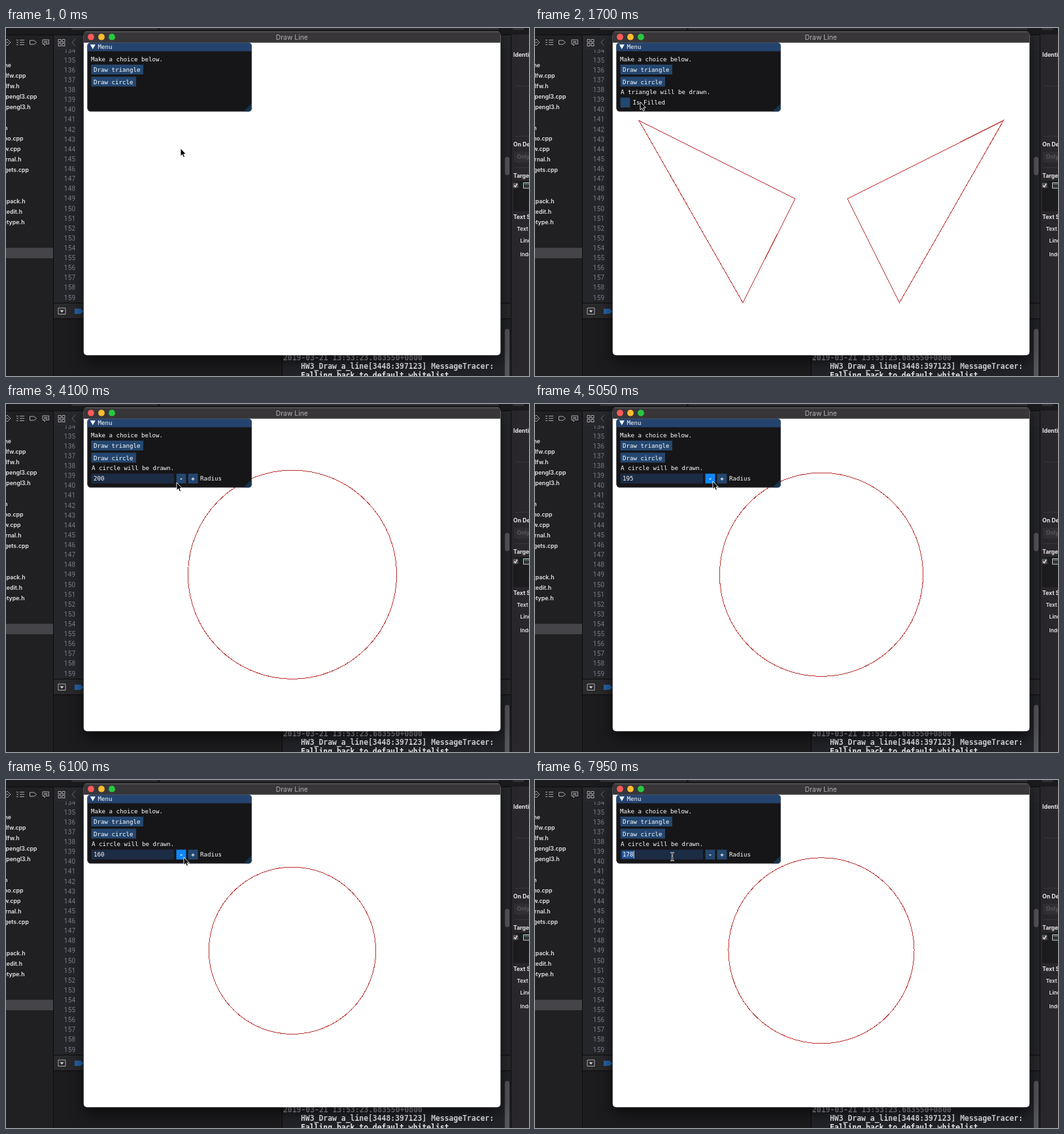
Animation, 800 px wide and 532 px high, one loop 8 s. Source, as an HTML page:

```html
<!DOCTYPE html>
<html lang="en">
<head>
<meta charset="utf-8">
<title>Draw Line</title>
<style>
html, body { margin: 0; width: 100%; height: 100%; overflow: hidden; background: #232226; }
svg { display: block; width: 100%; height: 100%; }
text { white-space: pre; }
.ui { font: 600 8.75px Inter, sans-serif; fill: #e6e5e8; }
.head { font-weight: 700; }
.gui { font: 9.15px "DejaVu Sans Mono", monospace; fill: #fff; }
.sign { font-weight: 700; }
.num { font: 10px "Roboto", "DejaVu Sans Mono", monospace; fill: #7b7f85; letter-spacing: .2px; }
.log { font: bold 11.42px "DejaVu Sans Mono", monospace; fill: #e8e8ea; }
.icon { fill: none; stroke: #a9a8ac; stroke-width: 1; }
.line { stroke: #b8322e; stroke-width: 1; fill: none; shape-rendering: crispEdges; }
.btn { fill: #24476f; }
</style>
</head>
<body>
<svg viewBox="0 0 800 532" preserveAspectRatio="none">
  <!-- editor behind the window -->
  <rect width="800" height="532" fill="#25262b"/>
  <rect width="800" height="10" fill="#1b1a1d"/>
  <path d="M100 0H232V3H100zM235 0H753V3H235zM775 0H792V3H775z" fill="#302f32"/>
  <rect y="10" width="72" height="522" fill="#201f22"/>
  <rect x="73" y="10" width="699" height="23" fill="#27282c"/>
  <rect y="336" width="72" height="16" fill="#454448"/>
  <g id="files" class="ui" text-anchor="end"></g>
  <clipPath id="rows"><rect x="73" y="33" width="60" height="387"/></clipPath>
  <g id="nums" class="num" text-anchor="end" clip-path="url(#rows)"></g>
  <path class="icon" d="M-3 22L2 17L7 22L2 27zM0 22H4M16 18.5H19M21 18.5H28M16 22H19M21 22H28M16 25.500H19M21 25.500H28M36.500 19H43L46.500 22L43 25H36.500zM56 18H65.500V24.500H61L58.500 27V24.500H56zM58 20.500H63.500M58 22.500H63.500"/>
  <path class="icon" d="M80 17.500H84V21.500H80zM86 17.500H90V21.500H86zM80 23.500H84V27.500H80zM86 23.500H90V27.500H86z"/>
  <path d="M105.500 17L101 22L105.500 27" fill="none" stroke="#6f6e72"/>
  <rect x="73" y="421" width="699" height="23" fill="#29292c"/>
  <rect x="73" y="444" width="699" height="88" fill="#1c1b1e"/>
  <rect x="422" y="444" width="350" height="88" fill="#222328"/>
  <path d="M0 10.500H800M72.500 10V532M73 420.500H772M73 444.500H772M422.500 444V532" stroke="#0c0c0e"/>
  <path class="icon" d="M80 428H91V437.500H80z"/>
  <path d="M82.500 431.500H88.500L85.500 435z" fill="#d8d8da"/>
  <path d="M105 429H114L118.500 433L114 437H105z" fill="#2862a8"/>
  <g class="log">
    <text x="424" y="508" style="fill:#99999d">2019-03-21 13:53:23.683550+0800</text>
    <text x="451" y="521">HW3_Draw_a_line[3448:397123] MessageTracer:</text>
    <text x="451" y="535">Falling back to default whitelist</text>
  </g>
  <rect x="763" y="197" width="7" height="28" rx="3.500" fill="#57575b"/>
  <rect x="763" y="460" width="7" height="90" rx="3.500" fill="#57575b"/>
  <rect x="772" y="10" width="28" height="522" fill="#29272b"/>
  <rect x="776" y="234" width="24" height="46" fill="#1c1b1e"/>
  <path d="M772.500 10V532" stroke="#0c0c0e"/>
  <path d="M778 88.500H800M778 165.500H800M778 213.500H800" stroke="#39373b"/>
  <rect x="777" y="189" width="30" height="17" rx="2" fill="#312f33"/>
  <rect x="775.500" y="236.500" width="8" height="8" rx="1.500" fill="#59585c"/>
  <path d="M777 240.500L779 243L782 238" stroke="#fff" stroke-width="1.200" fill="none"/>
  <path d="M791.500 236.500H801V245H791.500z" fill="#333" stroke="#c8c8ca"/>
  <path d="M793 238.500H800" stroke="#39a58c"/>
  <g id="panel" class="ui"></g>

  <!-- window -->
  <rect x="118.800" y="5.500" width="637.600" height="494.700" rx="5" fill="#fff" style="filter:drop-shadow(0 8px 11px rgba(0,0,0,.65))"/>
  <path d="M118.800 22.500V10.500Q118.800 5.500 123.800 5.500H751.400Q756.400 5.500 756.400 10.500V22.500z" fill="#383639"/>
  <path d="M121.500 6H753.500" stroke="#59575a"/>
  <circle cx="130" cy="13.700" r="4.900" fill="#fc5b57"/>
  <circle cx="146" cy="13.700" r="4.900" fill="#fdbc2e"/>
  <circle cx="162" cy="13.700" r="4.900" fill="#28c840"/>
  <text x="437.300" y="17.500" text-anchor="middle" style="font:10.400px Inter,sans-serif;fill:#b3b1b4">Draw Line</text>

  <path id="tri" class="line" d="M159 141.500L398 261L318 420zM716.500 141.500L478 261L557.500 420z"/>
  <circle id="circle" class="line" cx="438" cy="260.800"/>

  <!-- menu -->
  <rect x="124.300" y="22.300" width="251.700" height="105.500" rx="5.500" fill="#161517"/>
  <path d="M124.300 35.500V27.800Q124.300 22.500 129.800 22.500H370.500Q376 22.500 376 27.800V35.500z" fill="#24446f"/>
  <path d="M376 115V122.500Q376 127.800 370.500 127.800H363z" fill="#17324d"/>
  <rect x="124.700" y="22.700" width="250.900" height="104.700" rx="5.200" fill="none" stroke="#6e6e80" stroke-opacity=".5" stroke-width=".8"/>
  <path d="M128.800 25.300H136.800L132.800 32.300z" fill="#fff"/>
  <rect id="bTri" class="btn" x="130.500" y="56" width="79.500" height="15"/>
  <rect id="bCir" class="btn" x="130.500" y="74.500" width="68.500" height="15"/>
  <g class="gui">
    <text x="140.500" y="32">Menu</text>
    <text x="130" y="51">Make a choice below.</text>
    <text x="134" y="67">Draw triangle</text>
    <text x="134" y="85.500">Draw circle</text>
    <text id="note" x="131" y="101"></text>
    <g id="triUI">
      <rect id="box" x="130.500" y="106.500" width="15" height="15"/>
      <path id="tick" d="M134 114L136.700 116.800L142 110.500" fill="none" stroke="#4296fa" stroke-width="1.600"/>
      <text x="149.500" y="117.300">Is Filled</text>
    </g>
    <g id="cirUI">
      <rect x="130.500" y="106.500" width="126.500" height="15" fill="#1c2c45"/>
      <rect id="sel" x="133" y="108" width="18" height="12" fill="#28589a"/>
      <text id="value" x="134" y="117.300"></text>
      <path id="caret" d="M151.300 108V120" stroke="#fff" stroke-width=".8"/>
      <rect id="bMinus" class="btn" x="260.500" y="106.500" width="15" height="15"/>
      <rect id="bPlus" class="btn" x="278.500" y="106.500" width="15" height="15"/>
      <text class="sign" x="265.200" y="117.300">-</text>
      <text class="sign" x="283.200" y="117.300">+</text>
      <text x="297" y="117.300">Radius</text>
    </g>
  </g>
  <path id="arrow" d="M0 0V12L2.700 9.600L4.400 13.600L6.500 12.700L4.800 8.800H8.400z" fill="#000" stroke="#fff" stroke-width=".9"/>
  <g id="beam" fill="none">
    <path d="M-3 -6Q0 -6 0 -4Q0 -6 3 -6M0 -4V4M-3 6Q0 6 0 4Q0 6 3 6M-1.500 2H1.500" stroke="#fff" stroke-width="2.200"/>
    <path d="M-3 -6Q0 -6 0 -4Q0 -6 3 -6M0 -4V4M-3 6Q0 6 0 4Q0 6 3 6M-1.500 2H1.500" stroke="#111" stroke-width=".9"/>
  </g>
</svg>
<script>
const $ = id => document.getElementById(id);
const LOOP = 8000, STEP = 50;

function label(parent, x, y, str, cls) {
  const el = document.createElementNS("http://www.w3.org/2000/svg", "text");
  el.setAttribute("x", x);
  el.setAttribute("y", y);
  if (cls) el.setAttribute("class", cls);
  el.textContent = str;
  $(parent).append(el);
  return el;
}

[["Draw_a_line", 8, 57], ["imgui_impl_glfw.cpp", 30.5, 73], ["imgui_impl_glfw.h", 20.5, 89],
 ["imgui_impl_opengl3.cpp", 47.5, 105], ["imgui_impl_opengl3.h", 37.5, 121], ["imgui.h", 2.5, 153],
 ["imgui_demo.cpp", 26.5, 169], ["imgui_draw.cpp", 22.5, 185], ["imgui_internal.h", 23.5, 201],
 ["imgui_widgets.cpp", 35, 217], ["imstb_rectpack.h", 29.5, 265], ["imstb_textedit.h", 25, 281],
 ["imstb_truetype.h", 28.5, 297]].forEach(([name, x, y]) => label("files", x, y + 3.3, name));

for (let i = 0; i < 26; i++) label("nums", 106.3, 37.6 + i * 15.12, 134 + i);

[["Identity", 776, 41, 1], ["On Demand", 776, 178, 1], ["Target", 776, 226, 1], ["Text Settings", 776, 289, 1],
 ["Text", 781.5, 307], ["Line", 786.5, 325], ["Indent", 786.5, 346]]
  .forEach(([s, x, y, bold]) => label("panel", x, y + 3.2, s, bold ? "head" : "")
    .style.fontSize = bold ? "8.7px" : "8.2px");
label("panel", 781.5, 200.3, "Only").style.fill = "#5d5b60";

// pointer path: time, x, y
const path = [
  [0, 267, 184], [150, 267, 184], [650, 190, 66], [1050, 190, 66], [1450, 161, 113],
  [3250, 161, 113], [3600, 175, 83], [3800, 175, 83], [4100, 261, 120], [4350, 272, 118],
  [6450, 272, 118], [6620, 281, 112], [7690, 281, 112], [7850, 210, 117], [LOOP, 210, 117]
];

function pointer(t) {
  const i = Math.max(1, path.findIndex(p => p[0] > t));
  const [t0, x0, y0] = path[i - 1], [t1, x1, y1] = path[i];
  const u = (t - t0) / (t1 - t0), e = u * u * (3 - 2 * u);
  return [x0 + (x1 - x0) * e, y0 + (y1 - y0) * e];
}

const within = (t, a, b) => t >= a && t < b;
const ticks = (t, start, max) => Math.min(max, Math.max(0, Math.floor((t - start) / 30)));
const radius = t => 200 - ticks(t, 4900, 50) + ticks(t, 6840, 28);
const show = (id, on) => { $(id).style.display = on ? "" : "none"; };

function render(t) {
  const [x, y] = pointer(t);
  const mode = t < 900 ? "" : t < 3750 ? "triangle" : "circle";
  const filled = within(t, 2200, 3150);
  const hit = (a, b, w, h = 13) => within(x, a, a + w) && within(y, b, b + h);

  const button = (id, a, b, w, down) => {
    $(id).style.fill = down ? "#0f87fa" : hit(a, b, w) ? "#4296fa" : "#24476f";
  };
  button("bTri", 130.5, 56, 79, within(t, 800, 900));
  button("bCir", 130.5, 74.5, 68, within(t, 3650, 3750));
  button("bMinus", 260.5, 106.5, 15, within(t, 4700, 6400));
  button("bPlus", 278.5, 106.5, 15, within(t, 6650, 7700));

  $("note").textContent = mode && `A ${mode} will be drawn.`;
  show("triUI", mode === "triangle");
  show("tri", mode === "triangle");
  show("cirUI", mode === "circle");
  show("circle", mode === "circle");

  const pressed = within(t, 2100, 2200) || within(t, 3050, 3150);
  $("box").style.fill = pressed ? "#2468b4" : hit(130, 106, 70) ? "#24476f" : "#1f2e46";
  show("tick", filled);
  $("tri").style.fill = filled ? "#d82622" : "none";
  $("tri").style.stroke = filled ? "none" : "";

  const r = radius(t), editing = t >= 7900;
  $("value").textContent = r;
  $("circle").setAttribute("r", r * 0.798);
  show("sel", editing);
  show("caret", editing);

  const overField = mode === "circle" && hit(130, 106, 127);
  show("arrow", !overField);
  show("beam", overField);
  $(overField ? "beam" : "arrow").setAttribute("transform", `translate(${x} ${y})`);
}

const start = performance.now();
function tick() {
  const t = (performance.now() - start) % LOOP;
  render(Math.floor(t / STEP) * STEP);
  requestAnimationFrame(tick);
}
tick();
</script>
</body>
</html>
```
